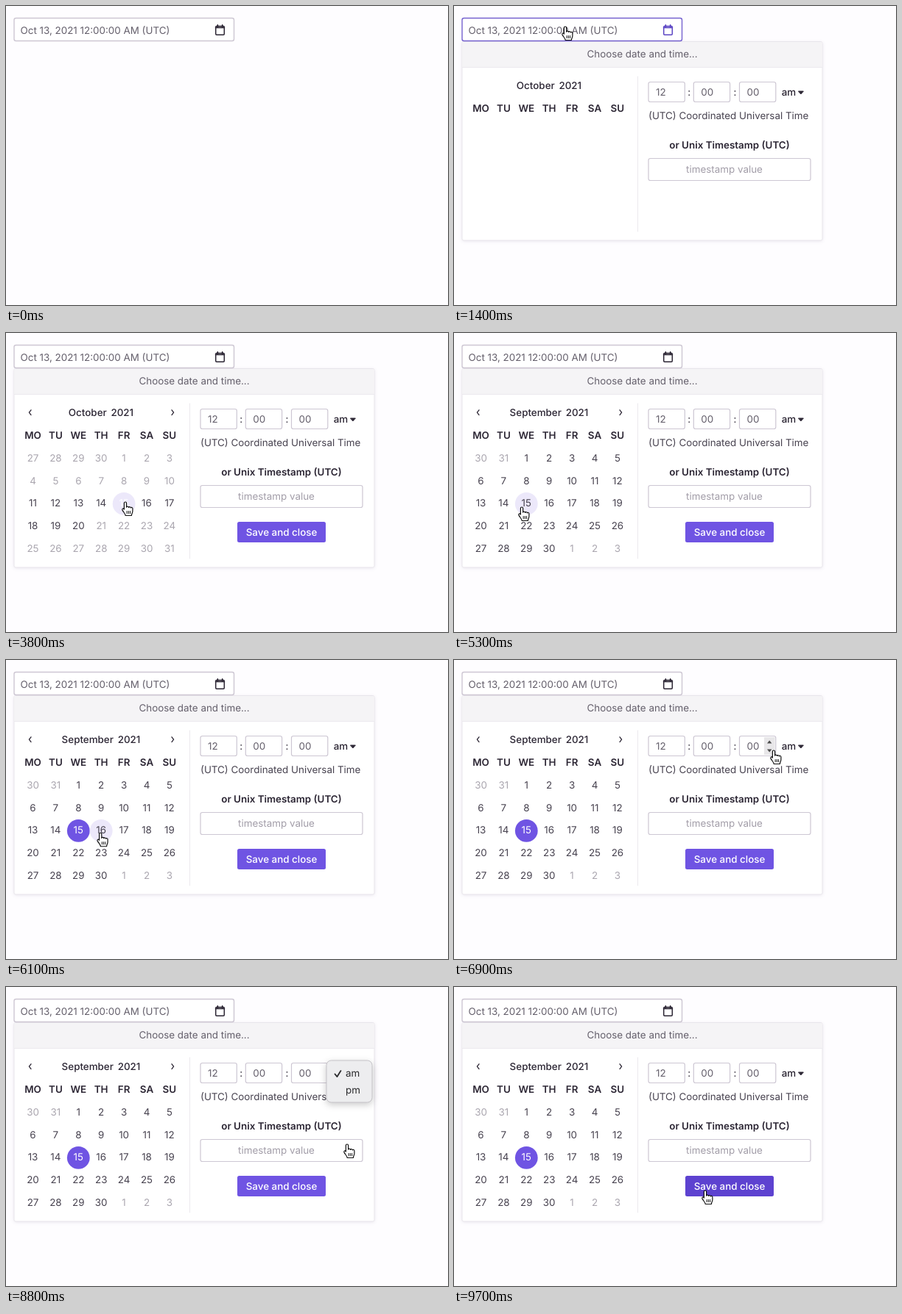
Write an HTML page that moves like this. It is 600x407 px and loops after 9.8 s.

```html
<!DOCTYPE html>
<html lang="en">
<head>
<meta charset="utf-8">
<title>Date and time picker</title>
<style>
  html, body { margin: 0; width: 100%; height: 100%; overflow: hidden; background: #fefdff; }
  svg { display: block; width: 600px; height: 407px; }
  text { font: 400 13.4px Inter, sans-serif; text-rendering: geometricPrecision; white-space: pre; }
  .panel { filter: drop-shadow(0 1px 2px rgba(60, 40, 90, .1)); }
  .menu { filter: drop-shadow(0 3px 5px rgba(0, 0, 0, .2)); }
</style>
</head>
<body>
<svg id="stage" viewBox="0 0 600 407"></svg>
<script>
const LOOP = 9800, STEP = 100;
const PURPLE = '#6f54e3', LAVENDER = '#ece8fa', INK = '#2b2533', BODY = '#47424f',
      FIELD = '#645f6b', DIM = '#aaa6af', LINE = '#cdc7d3';
const stage = document.getElementById('stage');

// Pointer tip: time, x, y
const PATH = [
  [100, 458, 184], [550, 64, 18], [800, 151, 28],
  [1900, 151, 28], [2150, 18, 150], [2400, 150, 276], [2700, 405, 200],
  [3200, 405, 200], [3400, 431, 262], [3800, 162, 230],
  [4000, 162, 230], [4500, 33, 106], [4900, 33, 106], [5300, 92, 237],
  [6000, 92, 237], [6500, 440, 220], [6900, 434, 123],
  [7200, 461, 118], [7800, 461, 122], [7900, 461, 132], [8200, 462, 136],
  [8600, 463, 214], [9100, 463, 214], [9600, 341, 277], [LOOP, 341, 277]
];

const clamp = v => Math.max(0, Math.min(1, v));
const ramp = (t, from, to) => clamp((t - from) / (to - from));

function pointerAt(t) {
  if (t < PATH[0][0]) return null;
  const i = PATH.findIndex(key => key[0] > t);
  const [t0, x0, y0] = PATH[i - 1], [t1, x1, y1] = PATH[i];
  const p = ramp(t, t0, t1), e = p * p * (3 - 2 * p);
  return { x: x0 + (x1 - x0) * e, y: y0 + (y1 - y0) * e };
}

const inside = (p, x, y, w, h) => p && p.x >= x && p.x <= x + w && p.y >= y && p.y <= y + h;

const rect = (x, y, w, h, fill, stroke = 'none', r = 0, extra = '') =>
  `<rect x="${x}" y="${y}" width="${w}" height="${h}" rx="${r}" fill="${fill}" stroke="${stroke}" ${extra}/>`;
const path = (d, fill, stroke = 'none', width = 1) =>
  `<path d="${d}" fill="${fill}" stroke="${stroke}" stroke-width="${width}" stroke-linecap="round" stroke-linejoin="round"/>`;
const label = (x, y, words, fill = BODY, anchor = 'middle', weight = 400, extra = '') =>
  `<text x="${x}" y="${y}" fill="${fill}" text-anchor="${anchor}" style="font-weight:${weight};${extra}">${words}</text>`;

function dateField(focused) {
  const icon = focused ? '#5b45c4' : INK;
  return rect(11, 16.5, 298.5, 31, '#fff', focused ? '#7562cf' : LINE, 2.5, 'stroke-width="1.4"') +
    label(19.5, 37.8, 'Oct 13, 2021 12:00:00 AM (UTC)', FIELD, 'start') +
    rect(284.7, 27.6, 11.6, 11.6, 'none', icon, 1.2, 'stroke-width="1.5"') +
    path('M284.7 29.4h11.6M287.3 26v2M293.7 26v2', 'none', icon, 1.8);
}

function timeFields(pointer, blocked) {
  let out = '';
  [[264, '12'], [325.3, '00'], [387.5, '00']].forEach(([x, value], i) => {
    out += rect(x, 103.5, 49.3, 27, '#fff', LINE, 2.5, 'stroke-width="1.2"') +
      label(x + 10, 122.3, value, FIELD, 'start');
    if (i) out += label(x - 6, 122, ':', INK);
    if (!blocked && inside(pointer, x, 103, 49.5, 28)) {
      out += rect(x + 33.5, 105, 14.5, 24, '#e8e7e9') +
        path(`M${x + 37.5} 113.5l3.2-4 3.2 4zM${x + 37.5} 121.5l3.2 4 3.2-4z`, '#4a4a4a');
    }
  });
  return out;
}

function days(firstDate, isEnabled, pointer, pick) {
  let out = '';
  for (let i = 0; i < 35; i++) {
    const date = new Date(2021, 8, firstDate + i);
    const x = 36.5 + 30.9 * (i % 7), y = 170 + 30.8 * Math.floor(i / 7);
    const enabled = isEnabled(date), picked = pick && pick.index === i;
    const hovered = enabled && pointer && Math.hypot(pointer.x - x, pointer.y - y) < 15.4;
    if (picked || hovered)
      out += `<circle cx="${x}" cy="${y + .8}" r="15.4" fill="${picked ? pick.fill : LAVENDER}"/>`;
    out += label(x, y + 4.8, date.getDate(), picked ? '#fff' : enabled ? BODY : DIM);
  }
  return out;
}

function calendar(t, pointer, appear) {
  const september = t >= 4700;
  const fade = september ? ramp(t, 4600, 5000) : appear;
  let pick = null;
  if (t >= 3800 && !september) pick = { index: 18, fill: t < 4000 ? LAVENDER : PURPLE };
  if (t >= 5600) pick = { index: 16, fill: PURPLE };
  const grid = september
    ? days(-1, d => d.getMonth() === 8, pointer, pick)
    : days(27, d => d.getMonth() === 9 && d.getDate() > 10 && d.getDate() < 21, pointer, pick);
  const weekdays = ['MO', 'TU', 'WE', 'TH', 'FR', 'SA', 'SU']
    .map((name, i) => label(36.5 + 30.9 * i, 143.7, name, INK, 'middle', 600)).join('');
  return label(129, 112.5, september ? 'September 2021' : 'October 2021', INK, 'middle', 500, 'word-spacing:2.2px') +
    weekdays +
    `<g opacity="${appear}">${path('M34 104.8l-2.6 3.4 2.6 3.4M225 104.8l2.6 3.4-2.6 3.4', 'none', INK, 1.3)}</g>` +
    `<g opacity="${fade}">${grid}</g>`;
}

function menu(pointer) {
  const row = inside(pointer, 435, 104, 62, 26) ? 0 : inside(pointer, 435, 130, 62, 24) ? 1 : -1;
  const ink = i => i === row ? '#fff' : '#2b2b2d';
  return `<g class="menu">${rect(435, 100, 62, 57, '#ededef', '#c4c2c7', 6.5)}</g>` +
    (row < 0 ? '' : rect(440, 106.5 + 23 * row, 52, 22.5, '#4591fb', 'none', 4)) +
    path('M446.5 118.5l3 3.6 5-8', 'none', ink(0), 1.8) +
    label(461, 122.4, 'am', ink(0), 'start') + label(461, 145, 'pm', ink(1), 'start');
}

function popup(t, pointer) {
  const appear = ramp(t, 1400, 1600), menuOpen = t >= 7300 && t < 9200;
  const target = menuOpen ? null : pointer;
  const save = inside(target, 314, 257, 120, 28) ? '#5d42d0' : PURPLE;
  return `<g class="panel">${rect(11, 48.5, 489, 270.5, '#fff', '#e8e5eb', 2)}</g>` +
    rect(11.5, 49, 488, 34, '#f5f4f6') +
    path('M11.5 83.5H500M249.5 96V307', 'none', '#ebe9ee') +
    label(255.5, 69.8, 'Choose date and time...', FIELD) +
    calendar(t, target, appear) +
    timeFields(pointer, menuOpen) +
    label(444.7, 122, 'am', INK, 'start', 500) + path('M467.8 116h6.6l-3.3 3.7z', INK, INK) +
    label(264, 154.4, '(UTC) Coordinated Universal Time', BODY, 'start') +
    label(374, 193.7, 'or Unix Timestamp (UTC)', INK, 'middle', 600) +
    rect(264, 207.5, 220, 30, '#fff', LINE, 2.5, 'stroke-width="1.2"') +
    label(367, 227, 'timestamp value', '#a29da8') +
    `<g opacity="${appear}">${rect(314, 257, 120, 28, save, 'none', 2.5)}${label(374, 275.7, 'Save and close', '#fff', 'middle', 500)}</g>` +
    (menuOpen ? menu(pointer) : '');
}

function cursor(p, hand) {
  const shape = hand
    ? path('M-1.6 1.6a1.6 1.6 0 0 1 3.2 0V7.2c.4-1.4 2.8-1.3 3 .3 .5-1.2 2.6-1 2.8 .5 .6-1 2.5-.6 2.5 1V12.5c0 2.5-1.5 3.5-1.5 6H.2c0-2-2.2-4-4.2-7.4 -.9-1.8 1-2.8 2-1.6l.4 .6z', '#fff', '#111', 1.2) +
      path('M2.2 12.5v3.2M4.4 12.5v3.2M6.6 12.5v3.2', 'none', '#111')
    : path('M0 0V15l3.5-3.2 2.3 5.2 2.4-1-2.3-5.1h4.7z', '#111', '#fff');
  return `<g transform="translate(${p.x} ${p.y})">${shape}</g>`;
}

function draw(t) {
  const pointer = pointerAt(t), open = t >= 1100;
  stage.innerHTML = (open ? popup(t, pointer) : '') +
    dateField(t >= 1000 && t < 3300) +
    (pointer ? cursor(pointer, open || inside(pointer, 11, 16, 299, 32)) : '');
}

let shown = -1;
function tick() {
  const t = Math.floor(performance.now() % LOOP / STEP) * STEP;
  if (t !== shown) draw(shown = t);
  requestAnimationFrame(tick);
}
tick();
</script>
</body>
</html>
```
